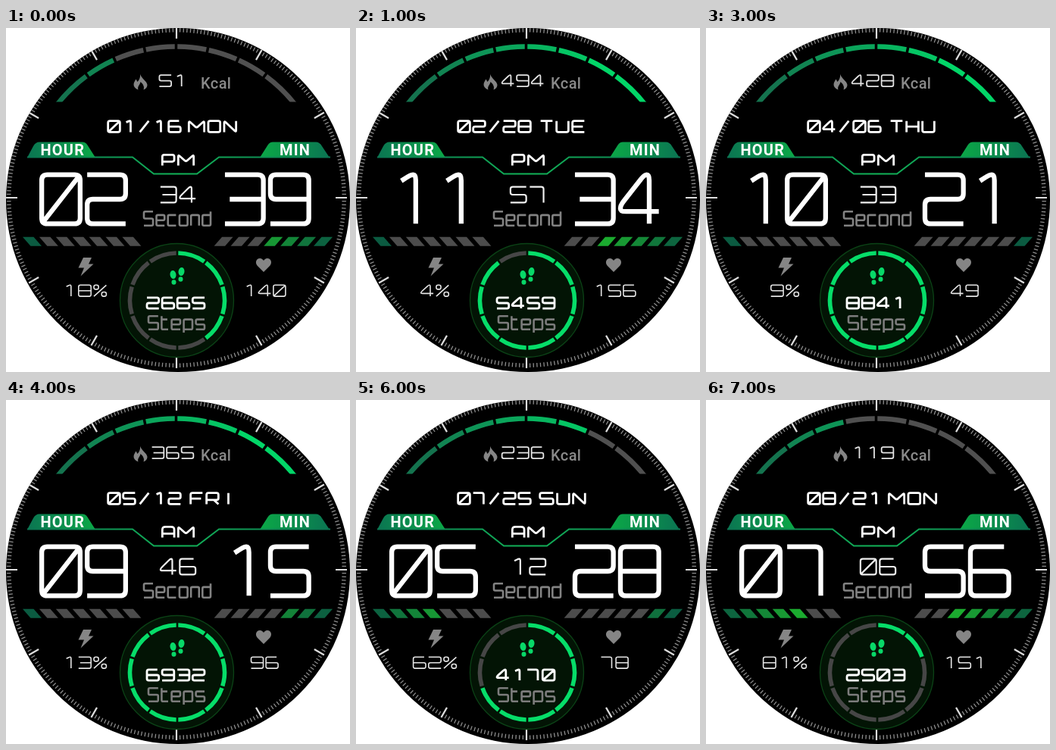
An HTML page that plays this animation: 454 by 454 pixels, repeating every 8000 ms.

```html
<!DOCTYPE html>
<html lang="en">
<head>
<meta charset="utf-8">
<title>Watch face</title>
<style>
html, body { margin: 0; width: 100%; height: 100%; overflow: hidden; background: #fff; }
svg { display: block; width: 454px; height: 454px; }
.glyphs { fill: none; stroke-linejoin: round; }
.banner { font: 700 20px Roboto, sans-serif; letter-spacing: 1.2px; fill: #fff; }
.unit { font: 500 20px Roboto, sans-serif; letter-spacing: .4px; fill: #8a8a8a; }
</style>
</head>
<body>
<svg viewBox="0 0 454 454">
  <defs>
    <linearGradient id="left"><stop offset="0" stop-color="#0b7552"/><stop offset="1" stop-color="#0ba847"/></linearGradient>
    <linearGradient id="right"><stop offset="0" stop-color="#0ba847"/><stop offset="1" stop-color="#0b7552"/></linearGradient>
    <linearGradient id="line" gradientUnits="userSpaceOnUse" x1="28" y1="0" x2="428" y2="0">
      <stop offset="0" stop-color="#0b7552"/><stop offset=".5" stop-color="#12b558"/><stop offset="1" stop-color="#0b7552"/>
    </linearGradient>
    <clipPath id="face"><circle cx="227" cy="227" r="227"/></clipPath>
    <clipPath id="arcClip"><rect width="454" height="97.5"/></clipPath>
  </defs>
  <circle cx="227" cy="227" r="227"/>
  <g id="ticks" clip-path="url(#face)"></g>
  <g id="arc" clip-path="url(#arcClip)" fill="none" stroke-width="6.5"></g>

  <path d="M28 171L36 156Q39 150.500 44 150.500H101Q105 150.500 107.500 154.500L118 171Z" fill="url(#left)"/>
  <path d="M335 171L345.500 154.500Q348 150.500 352 150.500H409Q414 150.500 417 156L427 171Z" fill="url(#right)"/>
  <path d="M28 170.500H167L195 192.500H252L281 170.500H428" fill="none" stroke="url(#line)" stroke-width="2"/>
  <text class="banner" x="45.500" y="168">HOUR</text>
  <text class="banner" x="361" y="168">MIN</text>
  <text class="unit" x="257" y="79.500">Kcal</text>

  <g fill="#858585">
    <path d="M177 61C179 67 186 70 186.500 75C186.500 78 184.500 80.500 181.500 81.500C183 77.500 181 74 177.500 71C177 75 173 77 174.500 81.500C170.500 80 168.500 77.500 168.500 74.500C168.500 71.500 170.500 69.500 171.500 67.500L173.500 71C176 68.500 177.500 65 177 61Z"/>
    <path d="M102 303H113L109 311.500H115.500L98.500 327.500L103 316.500H95.500Z"/>
    <path d="M340 322L331.500 313.500C328 309 331 304 335 304C337.500 304 339 305.500 340 307C341 305.500 342.500 304 345 304C349 304 352 309 348.500 313.500Z"/>
  </g>

  <circle cx="225.500" cy="359.500" r="75" fill="#031405" stroke="#0b4216" stroke-width="1.300"/>
  <g id="ring" fill="none" stroke-width="5.600"></g>
  <g fill="#08d868">
    <ellipse cx="220.500" cy="325.500" rx="4" ry="5.500" transform="rotate(-8 220.500 325.500)"/>
    <ellipse cx="221.500" cy="335.500" rx="3" ry="3.200"/>
    <ellipse cx="231.500" cy="321.500" rx="4" ry="5.500" transform="rotate(8 231.500 321.500)"/>
    <ellipse cx="230.500" cy="331.500" rx="3" ry="3.200"/>
  </g>
  <g id="bars"></g>
  <g id="labels" class="glyphs"></g>
</svg>
<script>
const $ = id => document.getElementById(id);

// Square lettering: strokes of points on an 8 x 8 grid, base 36 per axis.
const GLYPHS = {
  0: '00 80 88 08 00|08 80',
  1: '21 40 50 58',
  2: '00 80 84 04 08 88',
  3: '00 80 88 08|14 84',
  4: '86 06 05 50 60 68',
  5: '80 00 04 84 88 08',
  6: '70 00 08 88 84 04',
  7: '00 70 78',
  8: '00 80 88 08 00|04 84',
  9: '84 04 00 80 88 08',
  '/': '18 70',
  '%': '00 30 33 03 00|55 85 88 58 55|08 80',
  A: '08 01 10 70 81 88|05 85',
  D: '00 80 88 08 00',
  E: '80 00 08 88|04 74',
  F: '80 00 08|04 74',
  H: '00 08|80 88|04 84',
  I: '40 48',
  M: '08 00 45 80 88',
  N: '08 00 88 80',
  O: '00 80 88 08 00',
  P: '08 00 80 85 05',
  R: '08 00 80 85 05|55 88',
  S: '80 00 04 84 88 08',
  T: '00 80|40 48',
  U: '00 08 88 80',
  W: '00 28 40 68 80',
  c: '82 02 08 88',
  d: '80 88 08 02 82',
  e: '88 08 02 82 85 05',
  n: '08 02 82 88',
  o: '02 82 88 08 02',
  p: '0a 02 82 88 08',
  s: '82 02 05 85 88 08',
  t: '00 08 88|02 72'
};
const WIDE = { M: 1.25, W: 1.5, S: 1.1, t: 0.8 };

// Slots: centre x, top, glyph width, height, gap, stroke, colour
const SLOTS = {
  kcal: [220, 61.3, 17.5, 16.7, 2, 1.8, '#e4e4e4'],
  date: [182.5, 121.3, 18.5, 17.5, 1.5, 2.8, '#fff'],
  day: [272.5, 121.3, 18.5, 17.5, 2.5, 2.8, '#fff'],
  half: [227, 166, 18.5, 17, 2.5, 2.8, '#fff'],
  hour: [102.5, 190.5, 57, 71, 3, 6.3, '#fff'],
  min: [344.3, 190.5, 57, 71, 3, 6.3, '#fff'],
  sec: [227, 208.5, 23, 23, 2.5, 2.2, '#f0f0f0'],
  secLabel: [226, 241, 13.3, 21, 1.9, 2.6, '#828282'],
  battery: [104, 338.5, 18, 16.4, 2.2, 1.6, '#e4e4e4'],
  heart: [341.3, 338.5, 17.6, 16.4, 2, 1.6, '#e4e4e4'],
  steps: [224, 354.5, 18.5, 17, 1.6, 2.8, '#fff'],
  stepLabel: [225, 379, 14, 20, 2, 2.6, '#7c7c7c']
};

const FIELDS = ['date', 'day', 'half', 'hour', 'min', 'sec', 'kcal', 'kcalLevel', 'battery', 'heart', 'steps', 'stepLevel'];
const STATES = [
  '01/16 MON PM 02 39 34 51 2 18 140 2665 4',
  '02/28 TUE PM 11 34 57 494 8 4 156 5459 9',
  '03/15 WED PM 04 07 18 177 5 20 132 1880 10',
  '04/06 THU PM 10 21 33 428 8 9 49 8841 10',
  '05/12 FRI AM 09 15 46 365 8 13 96 6932 10',
  '06/10 SAT AM 02 47 29 317 8 41 160 5287 10',
  '07/25 SUN AM 05 28 12 236 6 62 78 4170 7',
  '08/21 MON PM 07 56 06 119 3 81 151 2503 2'
].map(row => Object.fromEntries(row.split(' ').map((v, i) => [FIELDS[i], v])));

function add(parent, tag, attrs) {
  const el = document.createElementNS('http://www.w3.org/2000/svg', tag);
  for (const k in attrs) el.setAttribute(k, attrs[k]);
  return parent.appendChild(el);
}

const polar = (cx, cy, r, deg) => {
  const a = deg * Math.PI / 180;
  return `${(cx + r * Math.sin(a)).toFixed(2)} ${(cy - r * Math.cos(a)).toFixed(2)}`;
};
const arcPath = (cx, cy, r, a, b) => `M${polar(cx, cy, r, a)}A${r} ${r} 0 0 1 ${polar(cx, cy, r, b)}`;
const mix = (a, b, t) => `rgb(${a.map((v, i) => Math.round(v + (b[i] - v) * t))})`;

const at = p => p.map(v => v.toFixed(2)).join(' ');

// The point r along the way from p to q, at most half way
function toward(p, q, r) {
  const dx = q[0] - p[0], dy = q[1] - p[1];
  const t = Math.min(0.5, r / Math.hypot(dx, dy));
  return [p[0] + dx * t, p[1] + dy * t];
}

// Polyline with rounded corners, closed when it ends where it began
function rounded(pts, r) {
  const last = pts.length - 1;
  const closed = last > 1 && at(pts[0]) === at(pts[last]);
  let d = 'M' + at(closed ? toward(pts[0], pts[1], r) : pts[0]);
  for (let i = 1; i < last + closed; i++) {
    const next = pts[i < last ? i + 1 : 1];
    d += `L${at(toward(pts[i], pts[i - 1], r))}Q${at(pts[i])} ${at(toward(pts[i], next, r))}`;
  }
  return d + (closed ? 'Z' : 'L' + at(pts[last]));
}

function lettering(str, [cx, top, w, h, gap, stroke]) {
  const widths = [...str].map(c => w * (WIDE[c] || 1));
  let x = cx - (widths.reduce((a, b) => a + b) + gap * (str.length - 1)) / 2;
  let d = '';
  [...str].forEach((c, i) => {
    const ux = (widths[i] - stroke) / 8, uy = (h - stroke) / 8;
    for (const line of GLYPHS[c].split('|')) {
      d += rounded(line.split(' ').map(p => [
        x + stroke / 2 + parseInt(p[0], 36) * ux,
        top + stroke / 2 + parseInt(p[1], 36) * uy
      ]), w * 0.13);
    }
    x += widths[i] + gap;
  });
  return d;
}

for (let i = 0; i < 300; i++) {
  const major = i % 25 === 0, a = i * 1.2;
  add($('ticks'), 'path', {
    d: `M${polar(225, 224, major ? 210 : 218.5, a)}L${polar(225, 224, major ? 225 : 224, a)}`,
    stroke: major ? '#dedede' : '#8c8c8c',
    'stroke-width': major ? 2.2 : 1.3
  });
}

const arcs = Array.from({ length: 8 }, (_, i) => {
  const a = (i - 4) * 12;
  return add($('arc'), 'path', {
    d: arcPath(224.5, 224, 199.5, i ? a + 0.5 : a - 5, i < 7 ? a + 11.5 : a + 17)
  });
});

const segs = Array.from({ length: 10 }, (_, i) =>
  add($('ring'), 'path', { d: arcPath(226, 359.5, 62.5, i * 36 + 1.2, i * 36 + 34.8) }));

// Bars run from the outer edge inwards on both sides.
const barRow = mirrored => Array.from({ length: 7 }, (_, i) => {
  const x = 22 + i * 21.9;
  const pts = [[x, 275.7], [x + 14.5, 275.7], [x + 25, 287.7], [x + 10.5, 287.7]];
  return add($('bars'), 'polygon', {
    points: pts.map(([px, py]) => `${mirrored ? 453 - px : px},${py}`).join(' ')
  });
});
const leftBars = barRow(false), rightBars = barRow(true);

const labels = {};
for (const name in SLOTS) {
  labels[name] = add($('labels'), 'path', { role: 'img', stroke: SLOTS[name][6], 'stroke-width': SLOTS[name][5] });
}
function write(name, str) {
  labels[name].setAttribute('d', lettering(str, SLOTS[name]));
  labels[name].setAttribute('aria-label', str);
}
write('secLabel', 'Second');
write('stepLabel', 'Steps');

function paintBars(bars, n) {
  bars.forEach((bar, i) => bar.setAttribute('fill',
    i < n ? mix([10, 88, 66], [28, 175, 46], i * 0.2 + n * 0.03) : '#4c4c4c'));
}

function show(s) {
  for (const name of ['date', 'day', 'half', 'hour', 'min', 'sec', 'kcal', 'heart', 'steps']) write(name, s[name]);
  write('battery', s.battery + '%');
  arcs.forEach((el, i) => el.setAttribute('stroke',
    i < s.kcalLevel ? mix([20, 115, 78], [2, 214, 104], Math.min(1, i / 6)) : '#505050'));
  segs.forEach((el, i) => el.setAttribute('stroke', i < s.stepLevel ? '#06dd69' : '#464646'));
  paintBars(leftBars, Math.max(1, Math.floor(s.battery * 7 / 100)));
  paintBars(rightBars, Math.min(7, Math.floor(s.heart / 30)));
}

let start = null, current = -1;
function frame(now) {
  if (start === null) start = now;
  const i = Math.floor((now - start) % 8000 / 1000);
  if (i !== current) show(STATES[current = i]);
  requestAnimationFrame(frame);
}
show(STATES[0]);
requestAnimationFrame(frame);
</script>
</body>
</html>
```
